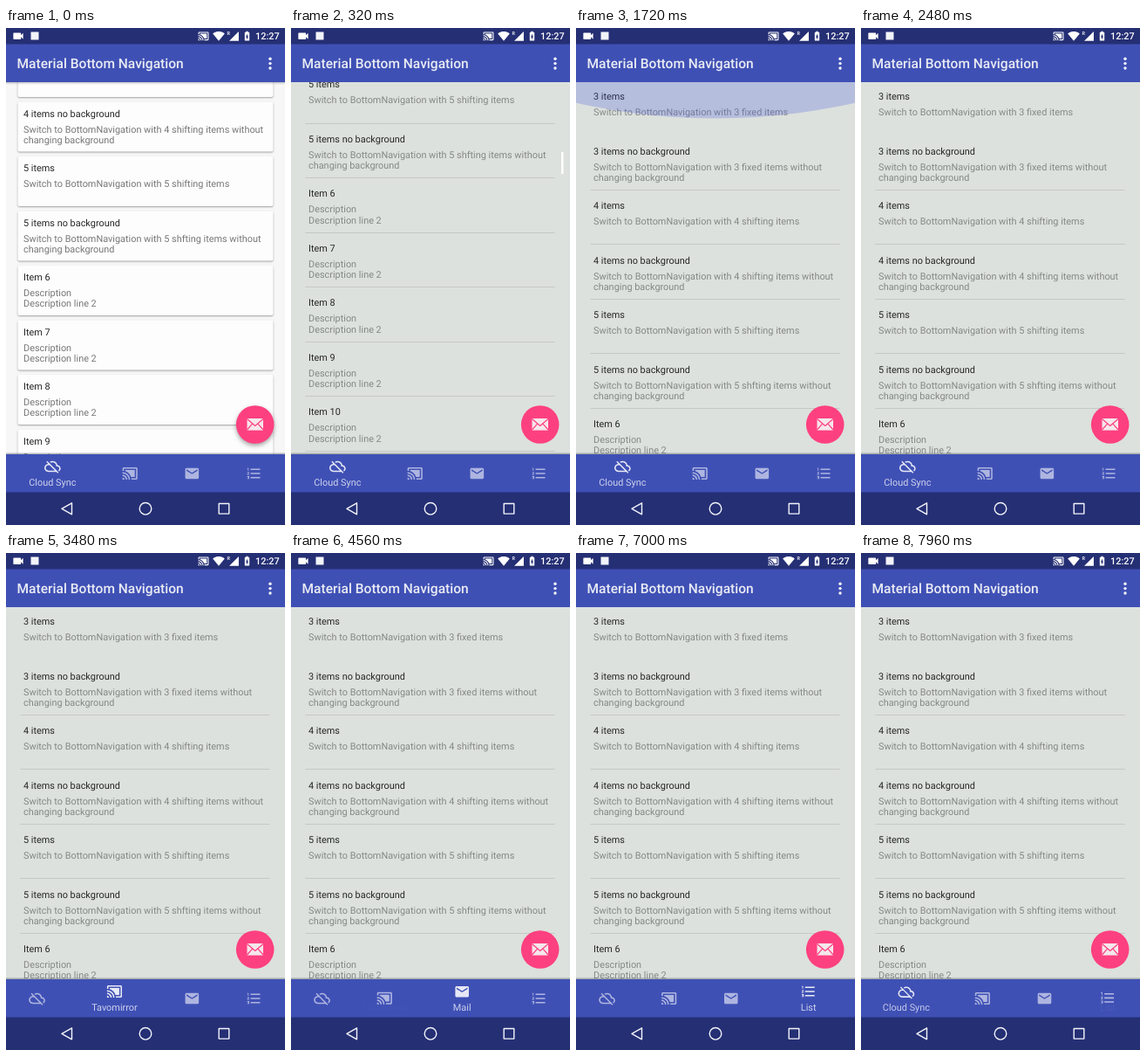
Recreate the animation shown at these times as an HTML page with a canvas. Size 320x569 px, loop 8000 ms.

```html
<!DOCTYPE html>
<html lang="en">
<head>
<meta charset="utf-8">
<title>Material Bottom Navigation</title>
<style>
html, body { margin: 0; width: 100%; height: 100%; overflow: hidden; background: #dce1dd; }
canvas { display: block; width: 100vw; height: 100vh; }
</style>
</head>
<body>
<canvas></canvas>
<script>
const W = 320, H = 569, LOOP = 8000;
const canvas = document.querySelector('canvas');
const ctx = canvas.getContext('2d');

// Icons on a 24 x 24 grid
const icon = d => new Path2D(d);
const CLOUD = icon('M19.35 10.04C18.67 6.59 15.64 4 12 4c-1.48 0-2.85.43-4.01 1.17l1.46 1.46C10.21 6.23 11.08 6 12 6c3.04 0 5.5 2.46 5.5 5.5v.5H19c1.66 0 3 1.34 3 3 0 1.13-.64 2.11-1.56 2.62l1.45 1.45C23.16 18.16 24 16.68 24 15c0-2.64-2.05-4.78-4.65-4.96zM3 5.27l2.75 2.74C2.56 8.15 0 10.77 0 14c0 3.31 2.69 6 6 6h11.73l2 2L21 20.73 4.27 4 3 5.27zM7.73 10l8 8H6c-2.21 0-4-1.79-4-4s1.79-4 4-4h1.73z');
const CAST = icon('M21 3H3c-1.1 0-2 .9-2 2v3h2V5h18v14h-7v2h7c1.1 0 2-.9 2-2V5c0-1.1-.9-2-2-2zM1 18v3h3c0-1.66-1.34-3-3-3zm0-4v2c2.76 0 5 2.24 5 5h2c0-3.87-3.13-7-7-7zm0-4v2c4.97 0 9 4.03 9 9h2c0-6.08-4.93-11-11-11zM19 7H5v1.63c3.96 1.28 7.09 4.41 8.37 8.37H19V7z');
const MAIL = icon('M20 4H4c-1.1 0-1.99.9-1.99 2L2 18c0 1.1.9 2 2 2h16c1.1 0 2-.9 2-2V6c0-1.1-.9-2-2-2zm0 4l-8 5-8-5V6l8 5 8-5v2z');
const LIST = icon('M2 17h2v.5H3v1h1v.5H2v1h3v-4H2v1zm1-9h1V4H2v1h1v3zm-1 3h1.8L2 13.1v.9h3v-1H3.2L5 10.9V10H2v1zm5-6v2h14V5H7zm0 14h14v-2H7v2zm0-6h14v-2H7v2z');
const VIDEO = icon('M17 10.5V7c0-.55-.45-1-1-1H4c-.55 0-1 .45-1 1v10c0 .55.45 1 1 1h12c.55 0 1-.45 1-1v-3.5l4 4v-11l-4 4z');
const WIFI = icon('M12 21.5L23.64 7C23.2 6.66 18.7 3 12 3S.81 6.66.36 7z');
const SIGNAL = icon('M2 22h20V2z');
const BATTERY = icon('M15.67 4H14V2h-4v2H8.33C7.6 4 7 4.6 7 5.33v15.33C7 21.4 7.6 22 8.33 22h7.33c.74 0 1.34-.6 1.34-1.33V5.33C17 4.6 16.4 4 15.67 4zM11 20v-5.5H9L13 7v5.5h2L11 20z');

const tabs = [['Cloud Sync', CLOUD], ['Tavomirror', CAST], ['Mail', MAIL], ['List', LIST]];
const taps = [[2900, 1], [4350, 2], [5785, 3], [7765, 0]];   // time, tab
const TAP_DURATION = 240;

const items = [];
for (const [n, kind] of [[3, 'fixed'], [4, 'shifting'], [5, 'shifting']]) {
  const text = `Switch to BottomNavigation with ${n} `;
  items.push([`${n} items`, `${text}${kind} items`]);
  items.push([`${n} items no background`,
    `${text}${n === 5 ? 'shfting' : kind} items without`, 'changing background']);
}
for (let n = 6; n < 14; n++) items.push([`Item ${n}`, 'Description', 'Description line 2']);

// time, scroll offset, velocity
const scrollKeys = [[0, 167.5, .45], [320, 263.5, .1], [450, 268, 0], [700, 268, 0],
  [1000, 127, -.6], [1400, 0, -.15]];

const clamp = x => Math.min(1, Math.max(0, x));
const ease = x => (1 - Math.cos(Math.PI * clamp(x))) / 2;

function scrollAt(t) {
  const i = scrollKeys.findIndex(key => key[0] > t);
  if (i < 0) return 0;
  const [t0, y0, v0] = scrollKeys[i - 1], [t1, y1, v1] = scrollKeys[i];
  const d = t1 - t0, u = (t - t0) / d, r = 1 - u;
  return y0 * (1 + 2 * u) * r * r + v0 * d * u * r * r + y1 * u * u * (3 - 2 * u) - v1 * d * u * u * r;
}

function rect(x, y, w, h, color) {
  ctx.fillStyle = color;
  ctx.fillRect(x, y, w, h);
}

function circle(x, y, r, color) {
  ctx.fillStyle = color;
  ctx.beginPath();
  ctx.arc(x, y, r, 0, 7);
  ctx.fill();
}

function text(str, x, y, color, size = 10.9, weight = 400, align = 'left') {
  ctx.font = `${weight} ${size}px Roboto, sans-serif`;
  ctx.textRendering = 'geometricPrecision';
  ctx.textAlign = align;
  ctx.fillStyle = color;
  ctx.fillText(str, x, y);
}

function drawIcon(path, x, y, size, color) {
  ctx.save();
  ctx.translate(x - size / 2, y - size / 2);
  ctx.scale(size / 24, size / 24);
  ctx.fillStyle = color;
  ctx.fill(path);
  ctx.restore();
}

function withShadow(blur, dy, alpha, draw) {
  ctx.save();
  const scale = ctx.getTransform().a;
  ctx.shadowColor = `rgba(0,0,0,${alpha})`;
  ctx.shadowBlur = blur * scale;
  ctx.shadowOffsetY = dy * scale;
  draw();
  ctx.restore();
}

function fade(y, h, from, to) {
  const g = ctx.createLinearGradient(0, y, 0, y + h);
  g.addColorStop(0, `rgba(70,75,80,${from})`);
  g.addColorStop(1, `rgba(70,75,80,${to})`);
  rect(0, y, W, h, g);
}

function drawList(t, bright) {
  const scroll = scrollAt(t);
  rect(0, 62, W, 426, bright ? '#f7f7f7' : '#dce1dd');
  items.forEach(([title, ...lines], i) => {
    const y = 82 + 62.5 * i - scroll;
    if (y < 10 || y > 510) return;
    if (bright) {
      withShadow(2, 1, .35, () => {
        ctx.fillStyle = '#fdfdfd';
        ctx.beginPath();
        ctx.roundRect(13.5, y - 17, 293, 57, 2);
        ctx.fill();
      });
    } else if (i > 0) {
      rect(16.5, Math.round(y + 40.4), 286, 1, '#c6c7c3');
    }
    text(title, 20, y, '#262626');
    lines.forEach((line, n) => text(line, 20, y + 18 + 12.3 * n, bright ? '#777' : '#858886'));
  });
  if (t >= 160 && t < 480) rect(310, 62 + scroll * .304, 2.5, 25, '#fcfefc');
}

function drawGlow(t) {
  const grow = ease((t - 1400) / 240), gone = ease((t - 1640) / 700);
  const size = grow * (1 - .15 * gone) * .65, alpha = .25 * grow * (1 - gone);
  if (alpha <= 0) return;
  ctx.fillStyle = `rgba(63,81,220,${alpha})`;
  ctx.beginPath();
  ctx.ellipse(160, 62 - 416 * size, 480, 480 * size, 0, 0, 7);
  ctx.fill();
}

function drawFab(bright) {
  withShadow(5, 2.5, bright ? .35 : 0, () => circle(285.7, 454, 21.8, '#fd4080'));
  rect(276.5, 447, 18.5, 13.6, '#f6e6ec');
  ctx.strokeStyle = '#fd4080';
  ctx.lineWidth = 1.2;
  ctx.beginPath();
  ctx.moveTo(276.5, 447.5);
  ctx.lineTo(285.75, 455.5);
  ctx.lineTo(295, 447.5);
  ctx.moveTo(276.5, 460);
  ctx.lineTo(282.6, 453.2);
  ctx.moveTo(295, 460);
  ctx.lineTo(288.9, 453.2);
  ctx.stroke();
}

function drawTopBars(bright) {
  if (bright) fade(62, 3, .3, 0);
  rect(0, 18, W, 44, '#3f50b5');
  rect(0, 0, W, 18.5, '#252f74');
  text('Material Bottom Navigation', 12.5, 46, '#e9ebf3', 15.55, 500);
  for (const y of [35.2, 40.6, 46]) circle(303, y, 1.7, '#f4f5fb');
  drawIcon(VIDEO, 14, 9.2, 15, '#fff');
  rect(28.5, 4.5, 9, 9, '#f2f4fa');
  drawIcon(CAST, 226.5, 9.3, 13, '#fff');
  drawIcon(WIFI, 244, 9.3, 14, '#fff');
  drawIcon(SIGNAL, 261.5, 9.3, 13, '#fff');
  text('R', 253.5, 7.5, '#fff', 5.5, 500);
  drawIcon(BATTERY, 276.5, 9.2, 13, '#fff');
  text('12:27', 286, 13, '#fff', 10.9, 500);
}

function tabWeights(t) {
  let weights = [1, 0, 0, 0];
  for (const [start, tab] of taps) {
    const p = ease((t - start) / TAP_DURATION);
    weights = weights.map((w, i) => w * (1 - p) + (i === tab ? p : 0));
  }
  return weights;
}

function drawBottomBars(t) {
  fade(485.5, 2.5, 0, .45);
  rect(0, 488, W, 44, '#3f50b5');
  const unit = W / 9;
  let left = 0;
  tabWeights(t).forEach((w, i) => {
    const width = unit * (2 + w), x = left + width / 2;
    const [label, path] = tabs[i];
    left += width;
    drawIcon(path, x, 510 - 8 * w, 18.7, `rgba(255,255,255,${.58 + .3 * w})`);
    if (w > .01) text(label, x, 524, `rgba(255,255,255,${.75 * w})`, 10.9, 400, 'center');
  });

  rect(0, 531.5, W, 38, '#252f74');
  ctx.strokeStyle = '#f2f4fa';
  ctx.lineWidth = 1.4;
  ctx.lineJoin = 'round';
  ctx.beginPath();
  ctx.moveTo(64, 550.3);
  ctx.lineTo(75.5, 543.8);
  ctx.lineTo(75.5, 556.8);
  ctx.closePath();
  ctx.moveTo(166.8, 550.3);
  ctx.arc(160, 550.3, 6.8, 0, 7);
  ctx.rect(244.2, 544.5, 11.6, 11.6);
  ctx.stroke();
}

function resize() {
  const ratio = devicePixelRatio || 1;
  const w = Math.round(innerWidth * ratio), h = Math.round(innerHeight * ratio);
  if (canvas.width !== w || canvas.height !== h) {
    canvas.width = w;
    canvas.height = h;
  }
  ctx.setTransform(w / W, 0, 0, h / H, 0, 0);
}

function frame() {
  const t = performance.now() % LOOP;
  const bright = t < 40;
  resize();
  drawList(t, bright);
  drawGlow(t);
  drawTopBars(bright);
  drawFab(bright);
  drawBottomBars(t);
  requestAnimationFrame(frame);
}
frame();
</script>
</body>
</html>
```
